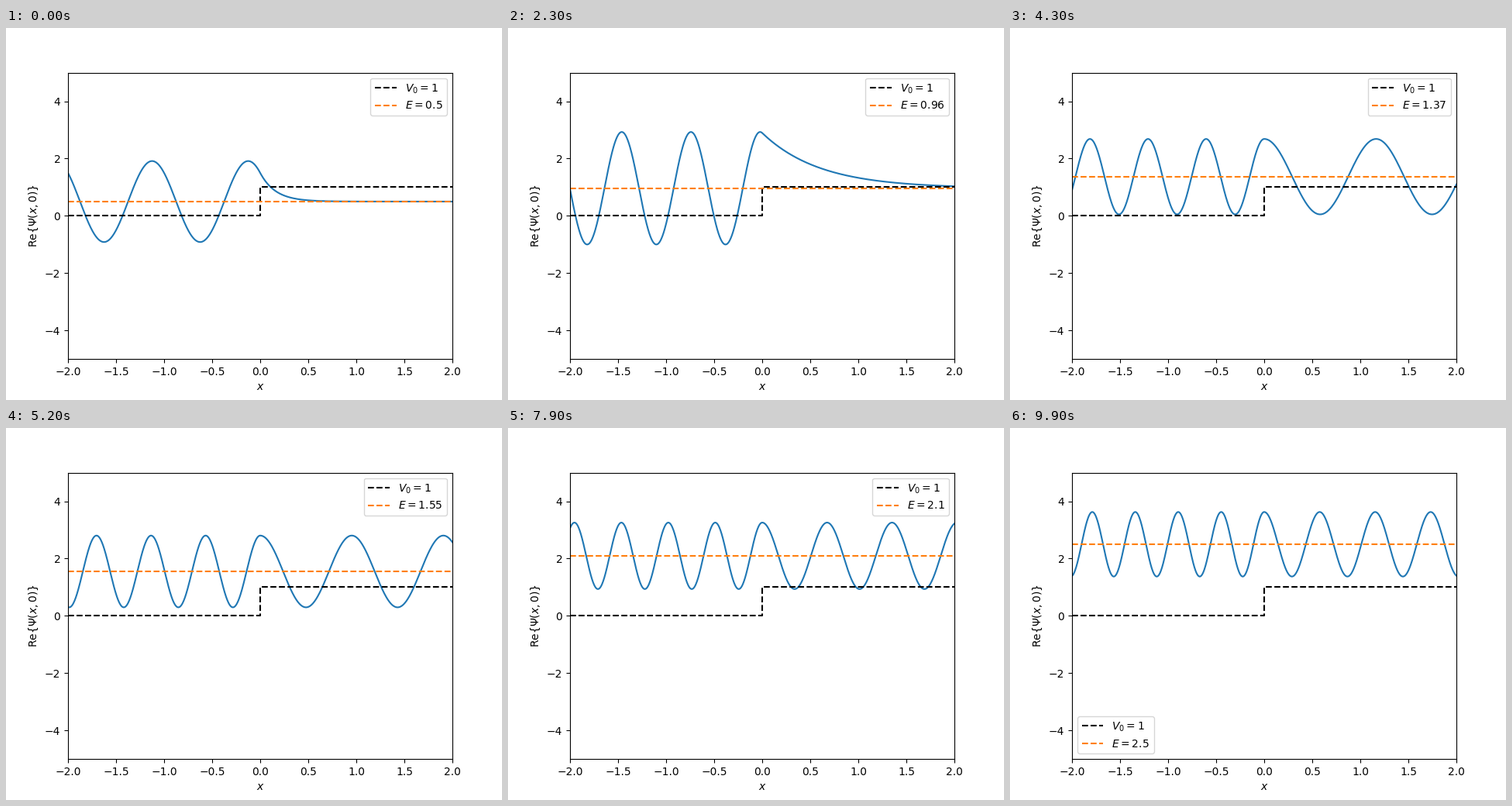
A matplotlib script for the animation above (10000 ms loop, 640 by 480 pixels).

```python
import numpy as np
import matplotlib.pyplot as plt
from matplotlib.animation import FuncAnimation

FRAMES = 100
V0 = 1
L = 2
energies = np.linspace(0.5, 2.5, FRAMES)
x = np.linspace(-L, L, 1000)


def wave_number(kinetic):
    """Complex wave number; imaginary where the motion is forbidden."""
    return 2 * np.pi * np.sqrt(2 * kinetic + 0j)


def psi(energy):
    """Scattering state of a potential step, unit incident amplitude."""
    k1 = wave_number(energy)
    k2 = wave_number(energy - V0)
    r = (k1 - k2) / (k1 + k2)
    t = 2 * k1 / (k1 + k2)
    left = np.exp(1j * k1 * x) + r * np.exp(-1j * k1 * x)
    right = t * np.exp(1j * k2 * np.maximum(x, 0))
    return np.where(x < 0, left, right)


fig, ax = plt.subplots(figsize=(6.4, 4.8), dpi=100)
ax.set_xlim(-L, L)
ax.set_ylim(-5, 5)
ax.set_xlabel("$x$")
ax.set_ylabel(r"Re$\{\Psi(x, 0)\}$")

wave, = ax.plot([], [], color="C0")
ax.plot([-L, 0, 0, L], [0, 0, V0, V0], "k--", label=f"$V_0 = {V0}$")
level, = ax.plot([], [], "--", color="C1")


def update(i):
    energy = energies[i]
    wave.set_data(x, psi(energy).real + energy)
    level.set_data([-L, L], [energy, energy])
    level.set_label(f"$E = {round(float(energy), 2)}$")
    legend = ax.legend(loc="best")
    return wave, level, legend


anim = FuncAnimation(fig, update, frames=FRAMES, init_func=lambda: update(0),
                     interval=100, repeat=True, repeat_delay=0, blit=False)
plt.show()
```
